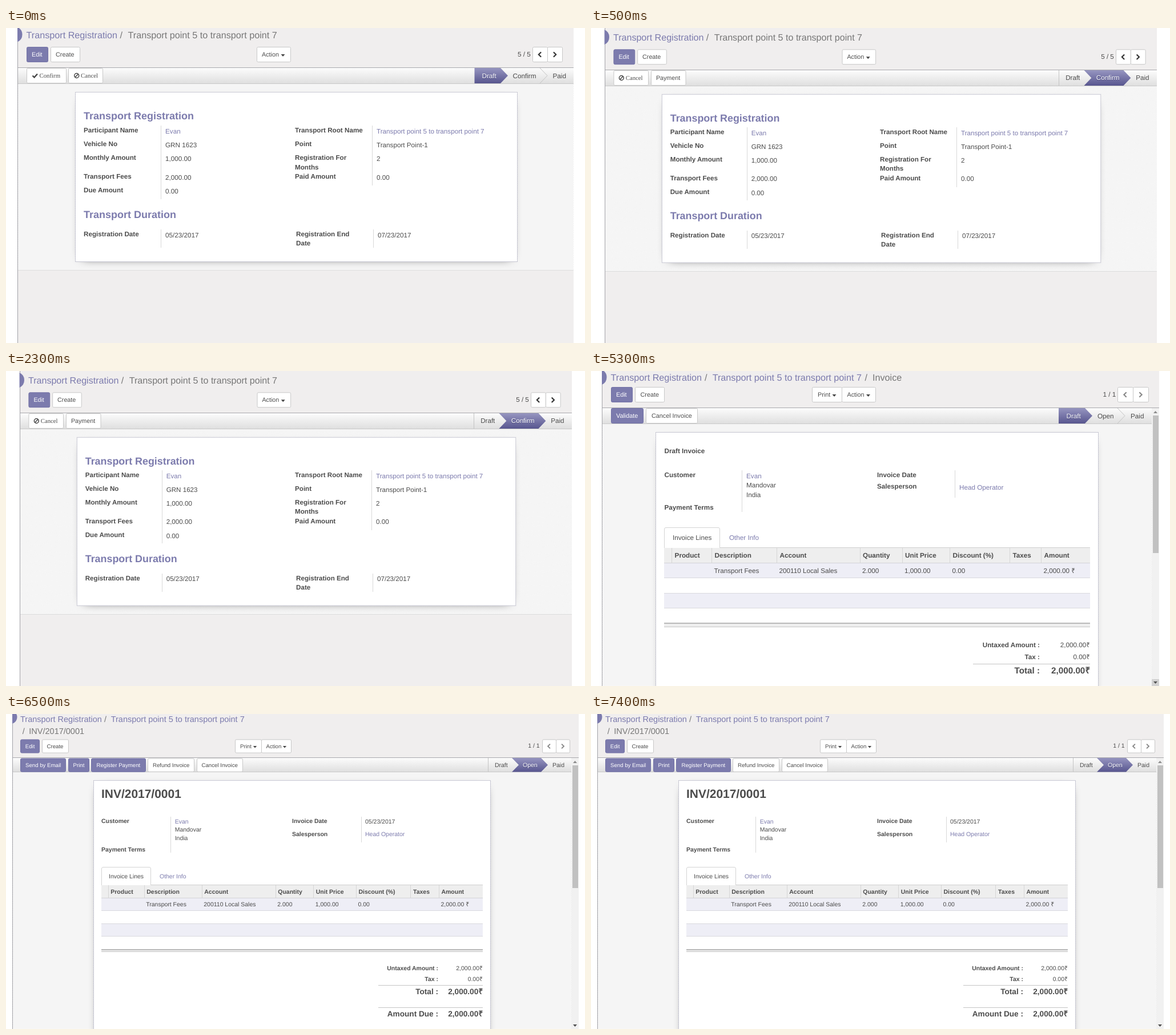
Recreate the animation shown at these times as an HTML page. Size 1014 by 552 pixels, loop 8 s.

```html
<!DOCTYPE html>
<html lang="en">
<head>
<meta charset="utf-8">
<title>Transport Registration</title>
<style>
html, body { margin: 0; width: 100%; height: 100%; overflow: hidden; background: #fff; }
svg { display: block; width: 1014px; height: 552px; }
text { font-family: "Liberation Sans", Arial, sans-serif; text-rendering: geometricPrecision; white-space: pre; }
.serif { font-family: "Liberation Serif", "Times New Roman", serif; }
.crisp { shape-rendering: crispEdges; }
.shade { filter: blur(9px); }
</style>
</head>
<body>
<svg id="stage" viewBox="0 0 1014 552" xmlns="http://www.w3.org/2000/svg"></svg>
<script>
const INK = '#4c4c4c', LINK = '#7c7bad', GREY = '#777', LINE = '#d8d8d8', PANEL = '#f0eeee';
const PERSON = 'Evan', CITY = 'Mandovar', SELLER = 'Head Operator';
let k = 0.9; // zoom of the current view

const box = (x, y, w, h, fill) =>
  `<rect class="crisp" x="${x}" y="${y}" width="${w}" height="${h}" fill="${fill}"/>`;
const path = (d, fill, stroke = 'none', width = 1) =>
  `<path d="${d}" fill="${fill}" stroke="${stroke}" stroke-width="${width}"/>`;
const hline = (x1, x2, y, color = LINE) => box(x1, y, x2 - x1, 1, color);
const vline = (x, y1, y2, color = LINE) => box(x, y1, 1, y2 - y1, color);

// y is the middle of the capitals
function text(x, y, s, { size = 13, fill = INK, bold, end, serif } = {}) {
  const px = size * k;
  return `<text x="${x}" y="${(y + px * 0.344).toFixed(2)}" font-size="${px.toFixed(2)}" fill="${fill}"` +
    (bold ? ' font-weight="700"' : '') + (end ? ' text-anchor="end"' : '') +
    (serif ? ' class="serif"' : '') + `>${s}</text>`;
}
const label = (x, y, s, end) => text(x, y, s, { bold: true, end });
const link = (x, y, s) => text(x, y, s, { fill: LINK });
const crumb = (x, y, s, fill = LINK) => text(x, y, s, { size: 18, fill });

function button(x1, x2, y1, y2, tx, s, { main, serif } = {}) {
  const shape = `<rect x="${x1 + .5}" y="${y1 + .5}" width="${x2 - x1 - 1}" height="${y2 - y1 - 1}" rx="2" ` +
    `fill="${main ? LINK : '#fff'}" stroke="${main ? '#7271a6' : '#c8c8c8'}"/>`;
  return shape + text(tx, (y1 + y2) / 2, s, { size: 12, fill: main ? '#fff' : INK, serif });
}
const caret = (x, y) => path(`M${x - 3.9 * k} ${y - 1}h${7.8 * k}l${-3.9 * k} ${4.4 * k}z`, '#444');

function pager(x, y1, y2, tx, s, w, color) {
  const y = (y1 + y2) / 2, h = 4.8 * k;
  const arrow = (cx, d) => path(`M${cx + d * h / 2} ${y - h}l${-d * h} ${h}l${d * h} ${h}`, 'none', color, 2.4 * k);
  return text(tx, y - 1, s) + button(x, x + w + 1, y1, y2, 0, '') +
    button(x + w, x + 2 * w + 1, y1, y2, 0, '') + arrow(x + w / 2, 1) + arrow(x + 1.5 * w, -1);
}

function shell(left, right, bar, low, end, bottom, disc) {
  const [reach, mid, half] = disc, sag = reach - left, r = (half * half + sag * sag) / (2 * sag);
  return box(left, -10, right - left, 580, PANEL) +
    box(left, low, end - left, bottom - low, 'url(#weave)') +
    box(left, bar, end - left, low - bar, 'url(#bar)') +
    hline(left, right, bar - 1, '#a9a9ad') + hline(left, end, low - 1, '#cacaca') +
    vline(left, -10, 570, '#a3a3a8') +
    path(`M${left} ${mid - half}A${r} ${r} 0 0 1 ${left} ${mid + half}z`, LINK);
}

// dark step from x1 to x2; notch cuts its left side
function activeStep(x1, x2, y1, y2, notch, tip) {
  const m = (y1 + y2) / 2;
  return path(`M${x1} ${y1}H${x2}L${x2 + tip} ${m}L${x2} ${y2}H${x1}${notch ? `L${x1 + tip} ${m}` : ''}z`, 'url(#step)');
}
const chevron = (x, y1, y2, tip) =>
  path(`M${x} ${y1}l${tip} ${(y2 - y1) / 2}l${-tip} ${(y2 - y1) / 2}`, 'none', '#c4c4c4');
const stepText = (x, y, s, on) =>
  (on ? text(x, y + 1, s, { fill: '#3d3c70' }) : '') + text(x, y, s, { fill: on ? '#fff' : INK });

function sheet(x1, x2, y1, y2) {
  const inset = 15 * k, w = x2 - x1, h = y2 - y1;
  return `<rect class="shade" x="${x1 + inset}" y="${y1 + inset + 5 * k}" width="${w - 2 * inset}" height="${h - 2 * inset}"/>` +
    `<rect x="${x1 + .5}" y="${y1 + .5}" width="${w - 1}" height="${h - 1}" fill="#fff" stroke="#c8c8d3"/>`;
}
const ban = (x, y) => `<circle cx="${x}" cy="${y}" r="4" fill="none" stroke="#444" stroke-width="1.5"/>` +
  path(`M${x - 2.8} ${y + 2.8}l5.6 -5.6`, 'none', '#444', 1.5);

function registration(confirmed) {
  k = 0.9;
  const route = 'Transport point 5 to transport point 7';
  let s = shell(20, 994, 70, 98, 994, 424, [28.5, 11.5, 13]) + hline(21, 994, 424, '#dcdcdc');
  s += crumb(35.5, 12, 'Transport Registration') + crumb(199.5, 12, '/', GREY) + crumb(213.5, 12, route, GREY);
  s += button(36, 74, 33, 60, 45, 'Edit', { main: true }) + button(78, 130, 33, 60, 87, 'Create') +
    button(439, 499, 33, 60, 448, 'Action') + caret(485, 47) + pager(922, 33, 60, 896, '5 / 5', 26, '#333');
  if (confirmed) {
    s += button(36, 98, 70, 97, 57.5, 'Cancel', { serif: true }) + ban(50, 83.5) +
      button(102, 164, 70, 97, 111, 'Payment') + vline(821, 70, 97, '#c4c4c4') +
      activeStep(866, 935.5, 70, 97, true, 13);
  } else {
    s += button(36, 106, 70, 97, 58.5, 'Confirm', { serif: true }) +
      path('M46.5 83.5l3 3l5.5 -6', 'none', '#444', 2.4) +
      button(109, 170, 70, 97, 131, 'Cancel', { serif: true }) + ban(123.7, 83.5) +
      activeStep(820.5, 866, 70, 97, false, 13) + chevron(935, 70, 97, 13);
  }
  s += stepText(833.5, 83.5, 'Draft', !confirmed) + stepText(887.5, 83.5, 'Confirm', confirmed) + stepText(957.5, 83.5, 'Paid');

  s += sheet(121, 896, 112, 410);
  s += text(136, 154, 'Transport Registration', { size: 20, fill: LINK, bold: true }) +
    text(136, 327, 'Transport Duration', { size: 20, fill: LINK, bold: true });
  s += vline(271, 171, 300) + vline(641, 171, 276) + vline(271, 353, 385) + vline(643, 353, 385);
  const rows = [179, 203, 227.3, 260, 284.3];
  ['Participant Name', 'Vehicle No', 'Monthly Amount', 'Transport Fees', 'Due Amount']
    .forEach((t, i) => s += label(136, rows[i], t));
  [PERSON, 'GRN 1623', '1,000.00', '2,000.00', '0.00']
    .forEach((t, i) => s += (i ? text : link)(279, rows[i] + 1.7, t));
  ['Transport Root Name', 'Point', 'Registration For', 'Paid Amount']
    .forEach((t, i) => s += label(506, rows[i], t));
  [route, 'Transport Point-1', '2', '0.00']
    .forEach((t, i) => s += (i ? text : link)(649, rows[i] + 1.7, t));
  return s + label(506, 243.5, 'Months') +
    label(136, 361, 'Registration Date') + text(279, 362.5, '05/23/2017') +
    label(508, 361, 'Registration End') + label(508, 377, 'Date') + text(651, 362.5, '07/23/2017');
}

function scrollbar(x, w, y, top, bottom) {
  const c = x + w / 2;
  return box(x, y, w, 552 - y, '#f1f1f1') + box(x + 2, top, w - 3, bottom - top, '#c1c1c1') +
    path(`M${c - 3.5} ${top - 4}h7l-3.5 -4z`, '#8c8c8c') + path(`M${c - 3.5} 544h7l-3.5 4z`, '#505050');
}

// tabs and invoice lines; edges are the column separators
function lines(x1, x2, tab, tabTop, tops, edges, gap) {
  const [head, row1, row1End, row2, row2End, foot, footEnd] = tops;
  const ty = (tabTop + head) / 2, hy = (head + row1) / 2 - .3, ry = (row1 + row1End) / 2 - .3;
  let s = box(x1, head, x2 - x1, row1 - head, '#eee') + hline(x1, x2, head - 1, '#cfcfcf') + hline(x1, x2, row1 - 1, '#d4d4d8');
  s += path(`M${x1 + .5} ${head}V${tabTop + 3}q0 -2.5 2.5 -2.5H${tab[0] - 3}q2.5 0 2.5 2.5V${head}`, '#fff', '#d4d4d4');
  s += text(tab[1], ty, 'Invoice Lines') + link(tab[2], ty, 'Other Info');
  s += box(x1, row1, x2 - x1, row1End - row1, '#eeeef6') + box(x1, row2, x2 - x1, row2End - row2, '#eeeef6');
  [row1End, row2, row2End].forEach(y => s += hline(x1, x2, y - 1, '#d9d9de'));
  s += box(x1, foot, x2 - x1, footEnd - foot, '#eee') + box(x1, foot - 1, x2 - x1, 2 * k, '#b9b9b9') + hline(x1, x2, footEnd, '#c4c4c4');
  const names = ['Product', 'Description', 'Account', 'Quantity', 'Unit Price', 'Discount (%)', 'Taxes', 'Amount'];
  const cells = ['', 'Transport Fees', '200110 Local Sales', '2.000', '1,000.00', '0.00', '', '2,000.00 ₹'];
  edges.forEach((x, i) => s += vline(x, head, row1 - 1, '#d6d6d6') +
    label(x + gap, hy, names[i]) + text(x + gap - 1, ry, cells[i]));
  return s;
}
const total = (x1, x2, y, name, value, big) =>
  text(x1, y, name, { bold: true, end: true, size: big ? 16.9 : 13 }) +
  text(x2, y, value, { bold: big, end: true, size: big ? 16.9 : 13 });

function draftInvoice() {
  k = 0.9;
  let s = shell(19, 995, 65, 93, 982, 560, [27.5, 11, 13]);
  s += crumb(34.5, 11.7, 'Transport Registration') + crumb(199, 11.7, '/', GREY) +
    crumb(212.7, 11.7, 'Transport point 5 to transport point 7') + crumb(479.5, 11.7, '/', GREY) + crumb(493, 11.7, 'Invoice', GREY);
  s += button(35, 73, 28, 55, 44, 'Edit', { main: true }) + button(77, 129, 28, 55, 86.5, 'Create') +
    button(387, 440, 28, 55, 397, 'Print') + caret(426, 42) +
    button(439, 499, 28, 55, 448.5, 'Action') + caret(485.5, 42) +
    pager(922, 28, 55, 896.5, '1 / 1', 27, '#8a8a8a');
  s += button(35, 92, 65, 92, 44, 'Validate', { main: true }) + button(96, 187, 65, 92, 106, 'Cancel Invoice');
  s += activeStep(819, 865, 65, 92, false, 13) + chevron(922, 65, 92, 13) +
    stepText(832.5, 78.5, 'Draft', true) + stepText(887, 78.5, 'Open') + stepText(945, 78.5, 'Paid');
  s += sheet(113, 889, 107, 580);
  s += label(128.5, 139.5, 'Draft Invoice') + label(128.5, 182, 'Customer') + label(128.5, 239, 'Payment Terms') +
    vline(264, 174, 247) + link(272, 184, PERSON) + text(272, 200, CITY) + text(272, 216.5, 'India') +
    label(501, 182, 'Invoice Date') + label(501, 202, 'Salesperson') + vline(637, 174, 222) + link(645, 203.5, SELLER);
  s += lines(128, 874, [226, 143, 242], 274, [310, 337, 363, 390, 416, 442, 448],
    [141, 211, 325, 470.5, 544.5, 628, 733, 788], 5.6);
  s += total(786, 874, 480, 'Untaxed Amount :', '2,000.00₹') + total(786, 874, 501, 'Tax :', '0.00₹') +
    hline(669, 874, 513, '#c4c4c4') + total(786, 874, 524.5, 'Total :', '2,000.00₹', true);
  return s + scrollbar(982, 13, 66, 78, 319) + box(982, 540, 13, 12, '#d2d2d2') + path('M985 544h7l-3.5 4z', '#505050');
}

function openInvoice() {
  k = 0.806;
  const top = 44.4, low = 68.6;
  let s = shell(11, 1003, 77, 102, 990, 560, [19.5, 5.5, 11.5]);
  s += crumb(25, 9, 'Transport Registration') + crumb(172, 9, '/', GREY) +
    crumb(183.7, 9, 'Transport point 5 to transport point 7') + crumb(28.7, 30, '/', GREY) + crumb(40.3, 30, 'INV/2017/0001', GREY);
  s += button(25, 59, top, low, 33.7, 'Edit', { main: true }) + button(63, 110, top, low, 71.5, 'Create') +
    button(401, 448, top, low, 410, 'Print') + caret(436, 57) +
    button(447, 500, top, low, 455.5, 'Action') + caret(488, 57) +
    pager(939, top, low, 914.3, '1 / 1', 24, '#8a8a8a');
  [[25, 105, 34, 'Send by Email', 1], [109, 146, 117.5, 'Print', 1], [149, 245, 158.5, 'Register Payment', 1],
    [248, 330, 257, 'Refund Invoice'], [334, 415, 342.5, 'Cancel Invoice']]
    .forEach(([a, b, x, t, main]) => s += button(a, b, 77.5, 101.7, x, t, { main }));
  s += vline(844, 77, 101, '#c4c4c4') + activeStep(886, 937, 77, 101.5, true, 12) +
    stepText(856, 89.3, 'Draft') + stepText(905, 89.3, 'Open', true) + stepText(957, 89.3, 'Paid');
  s += sheet(153, 849, 116, 580);
  s += text(167, 140.2, 'INV/2017/0001', { size: 26, bold: true }) +
    label(167, 187.5, 'Customer') + label(167, 237, 'Payment Terms') +
    vline(288, 180, 243) + link(295.7, 188, PERSON) + text(295.7, 202.5, CITY) + text(295.7, 217, 'India') +
    label(501, 187.5, 'Invoice Date') + text(629, 188, '05/23/2017') +
    label(501, 210, 'Salesperson') + link(629, 210.7, SELLER) + vline(622, 180, 225);
  s += lines(167, 835, [254, 180, 269], 268, [300, 323, 345, 368, 390, 413, 416],
    [178.5, 241.5, 342.5, 471.5, 538, 612.7, 708.3, 757.7], 4.8);
  s += total(757, 835, 445.5, 'Untaxed Amount :', '2,000.00₹') + total(757, 835, 464.5, 'Tax :', '0.00₹') +
    hline(652, 835, 475, '#c4c4c4') + total(757, 835, 486.5, 'Total :', '2,000.00₹', true) +
    hline(652, 835, 514, '#c4c4c4') + total(757, 835, 525, 'Amount Due :', '2,000.00₹', true);
  return s + scrollbar(990, 13, 78, 90, 305);
}

const fade = (id, a, b) => `<linearGradient id="${id}" x2="0" y2="1"><stop stop-color="${a}"/><stop offset="1" stop-color="${b}"/></linearGradient>`;
const defs = `<defs>${fade('bar', '#fcfcfc', '#dedede')}${fade('step', '#9695c0', '#58568f')}
<pattern id="weave" width="4" height="4" patternUnits="userSpaceOnUse">
<path d="M0 0h4v4h-4z" fill="#f9f9f9"/><path d="M0 0h1v1h-1zM2 0h1v1h-1zM1 2h1v1h-1zM3 2h1v1h-1z" fill="#e9e9e9"/>
</pattern></defs>`;

const views = [
  [500, registration(false)],
  [3500, `<g transform="translate(3.7 4.6) scale(.9928)">${registration(true)}</g>`],
  [6500, draftInvoice()],
  [8000, openInvoice()]
];
const stage = document.getElementById('stage');
stage.innerHTML = defs + views.map(v => `<g class="view">${v[1]}</g>`).join('');
const groups = [...stage.querySelectorAll('.view')];

function show(now) {
  const t = now % 8000, on = views.findIndex(v => t < v[0]);
  groups.forEach((g, i) => g.style.display = i === on ? '' : 'none');
  requestAnimationFrame(show);
}
show(performance.now());
</script>
</body>
</html>
```
